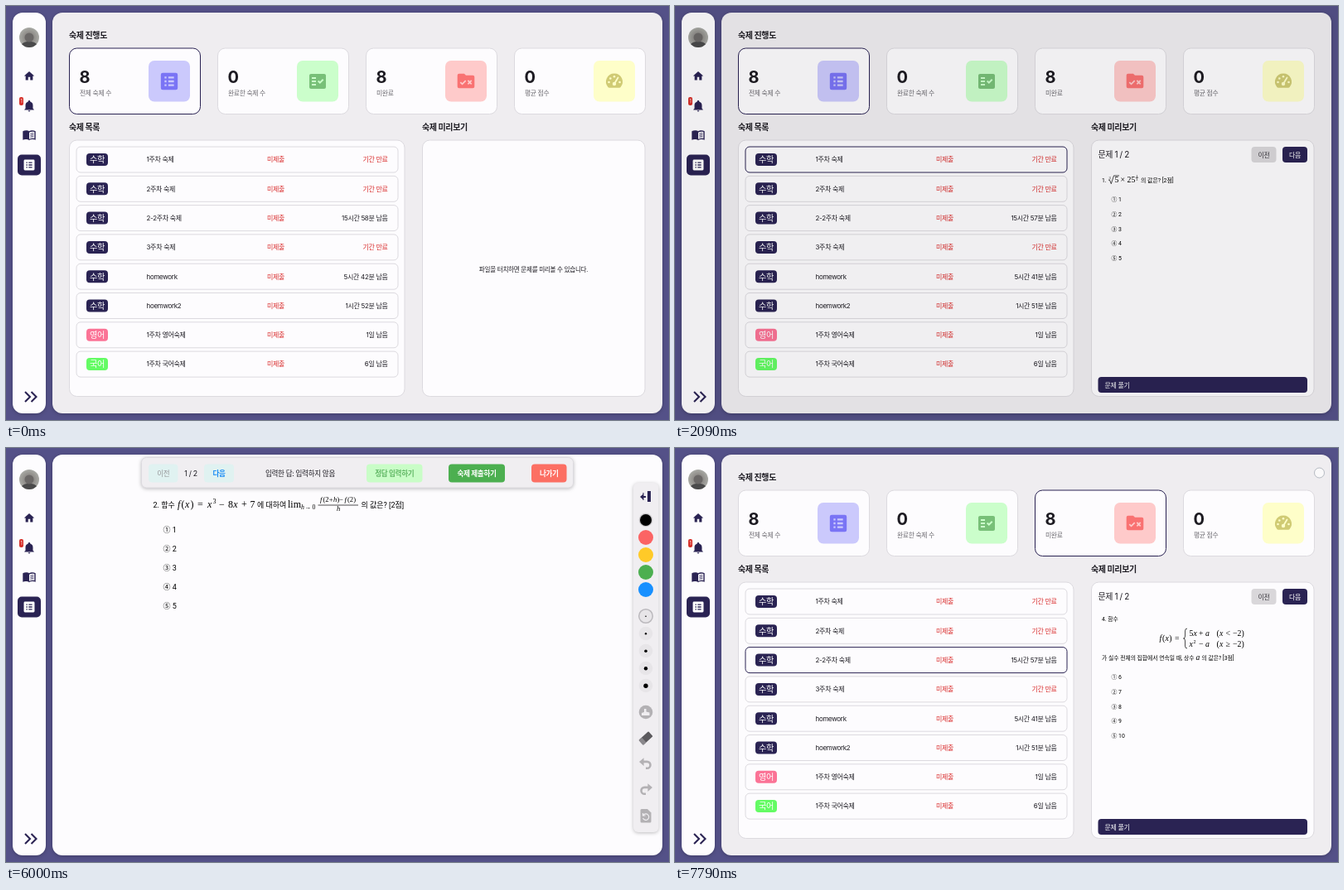
Animation of 800 by 500 pixels, one loop 7.85 s. Source, as an HTML page:

```html
<!DOCTYPE html>
<html lang="ko">
<head>
<meta charset="utf-8">
<style>
html, body { margin: 0; width: 100%; height: 100%; overflow: hidden; background: #545188; }
svg { display: block; width: 800px; height: 500px; }
text { font-family: Inter, "Noto Sans CJK KR", "Noto Sans CJK", sans-serif; letter-spacing: -.04em; fill: #1d1b22; }
.mid { text-anchor: middle; }
.end { text-anchor: end; }
.bold { font-weight: 700; }
.semi { font-weight: 600; }
.quiz { font-family: Roboto, "Noto Sans CJK KR", "Noto Sans CJK", sans-serif; letter-spacing: 0; fill: #000; }
.math { font-family: "Liberation Serif", "Noto Serif", serif; letter-spacing: 0; fill: #000; }
.it { font-style: italic; }
.box { fill: #fdfcfe; stroke: #dcdadf; }
.box.sel { stroke: #2a2353; }
.btn { fill: #2a2353; }
.btn + text { fill: #fff; }
.btn.off { fill: #d9d7da; }
.btn.off + text { fill: #3c3a40; }
.ink { fill: #2a2353; }
.line { fill: none; stroke: #000; stroke-width: .7; }
.soft { filter: drop-shadow(0 1px 2px rgba(0, 0, 0, .25)); }
</style>
</head>
<body>
<svg id="stage" viewBox="0 0 800 500"></svg>
<script>
const LOOP = 7850;
const NAVY = '#2a2353';

const text = (x, y, size, str, cls = '', fill = '') =>
  `<text x="${x}" y="${y}" font-size="${size}" class="${cls}"${fill && ` style="fill:${fill}"`}>${str}</text>`;
const rect = (x, y, w, h, r, attrs = '') =>
  `<rect x="${x}" y="${y}" width="${w}" height="${h}" rx="${r}" ${attrs}/>`;
const circle = (x, y, r, attrs = '') => `<circle cx="${x}" cy="${y}" r="${r}" ${attrs}/>`;
const group = (id, body, attrs = '') => `<g id="${id}" ${attrs}>${body}</g>`;
// 24-unit icon centred on a point
const icon = (x, y, scale, fill, body) =>
  `<g transform="translate(${x} ${y}) scale(${scale}) translate(-12 -12)" fill="${fill}" fill-rule="evenodd">${body}</g>`;
const path = (d, attrs = '') => `<path d="${d}" ${attrs}/>`;
const math = (y, size, parts) =>
  parts.map(([x, str, it]) => text(x, y, size, str, it ? 'math it' : 'math')).join('');

const LIST = path('M19 3H5a2 2 0 0 0-2 2v14a2 2 0 0 0 2 2h14a2 2 0 0 0 2-2V5a2 2 0 0 0-2-2M7 7h2v2H7zM7 11h2v2H7zM7 15h2v2H7zM17 17h-6v-2h6zM17 13h-6v-2h6zM17 9h-6V7h6z');
const CHECKS = path('M20 3H4c-1.1 0-2 .9-2 2v14c0 1.1.9 2 2 2h16c1.1 0 2-.9 2-2V5c0-1.1-.9-2-2-2zM10 17H5v-2h5v2zm0-4H5v-2h5v2zm0-4H5V7h5v2zm4.82 6L12 12.16l1.41-1.41 1.41 1.42L17.99 9l1.42 1.42L14.82 15z');
const FOLDER = path('M20 5h-8l-2-2H4a2 2 0 0 0-2 2v13a2 2 0 0 0 2 2h16a2 2 0 0 0 2-2V7a2 2 0 0 0-2-2z') +
  path('M5.5 13l2.2 2.2 4-4M14.3 11l4.2 4.2m0-4.2l-4.2 4.2', 'fill="none" stroke="#fecaca" stroke-width="1.7"');
const GAUGE = path('M12 2.5a10 10 0 0 0-7.6 16.5q.6.7 1.5.7h12.2q.9 0 1.5-.7A10 10 0 0 0 12 2.5z') +
  path('M12.3 14.5l4.2-7', 'stroke="#fefec9" stroke-width="1.8" stroke-linecap="round"') +
  [[5.5, 13], [7.3, 8.5], [12, 6.2], [18.5, 13], [12, 15]].map(([x, y], i) => circle(x, y, i < 4 ? 1.3 : 2.2, 'fill="#fefec9"')).join('');
const HOME = path('M10 20v-6h4v6h5v-8h3L12 3 2 12h3v8z');
const BELL = path('M21 19v1H3v-1l2-2v-6c0-3.1 2-5.8 5-6.7V4a2 2 0 0 1 4 0v.3c3 .9 5 3.6 5 6.7v6zM14 21a2 2 0 0 1-4 0z');
const BOOK = path('M12 6C9.500 4.200 4 4 1 6v15c3-1.500 8-1.500 11 .5 3-2 8-2 11-.5V6c-3-2-8.500-1.800-11 0zM21 18.500c-3-.8-6.500-.3-9 1V8c2.500-1.600 6-1.900 9-1z') +
  path('M14 10.500q3-1.200 5.500-.8M14 13.300q3-1.200 5.500-.8M14 16.100q3-1.200 5.500-.8', `fill="none" stroke="${NAVY}" stroke-width="1.3"`);

function sidebar() {
  return rect(8, 8, 40, 484, 12, 'fill="#fdfcfe" class="soft"') +
    circle(28, 38, 12, 'fill="url(#photo)"') +
    `<g clip-path="url(#face)">${path('M17 52c0-7 5-9 11-9s11 2 11 9z', 'fill="#4a4a4b"')}${circle(28, 38, 5.5, 'fill="#6b6867"')}</g>` +
    icon(28, 84.500, .62, NAVY, HOME) + icon(28, 120.500, .64, NAVY, BELL) +
    rect(16, 110, 5, 10, 2, 'fill="#d6302a"') + text(18.500, 117, 5.500, '1', 'mid', '#fff') +
    icon(28, 155.500, .7, NAVY, BOOK) +
    rect(14, 179.500, 28, 25, 5, 'class="ink"') + icon(28, 192, .72, '#fff', LIST) +
    path('M23 466l6 6-6 6M30.500 466l6 6-6 6', `fill="none" stroke="${NAVY}" stroke-width="2.100"`);
}

const cards = [
  [76.5, 8, '전체 숙제 수', '#cbc9fc', '#7a74f5', LIST, 1.13],
  [255.5, 0, '완료한 숙제 수', '#cbfecb', '#78c078', CHECKS, 1],
  [434.5, 8, '미완료', '#fecaca', '#f97272', FOLDER, 1.03],
  [613.5, 0, '평균 점수', '#fefec9', '#d0cb74', GAUGE, 1]
];
const card = ([x, n, label, tile, tone, shape, scale], i) =>
  rect(x, 51, 158, 79.500, 9, `class="box" id="card${i}"`) +
  text(x + 12, 93, 20, n, 'bold') + text(x + 12.500, 107.500, 7.800, label, '', '#6a686e') +
  rect(x + 95.500, 66, 50, 49.500, 7, `fill="${tile}"`) + icon(x + 120.500, 91, scale, tone, shape);

const rows = [
  ['수학', '1주차 숙제'], ['수학', '2주차 숙제'], ['수학', '2-2주차 숙제', 15, 58], ['수학', '3주차 숙제'],
  ['수학', 'homework', 5, 42], ['수학', 'hoemwork2', 1, 52],
  ['영어', '1주차 영어숙제', '1일 남음'], ['국어', '1주차 국어숙제', '6일 남음']
];
const tagColor = { 수학: NAVY, 영어: '#fb7396', 국어: '#64fb64' };
function row([tag, title, left, min], i) {
  const y = 170 + i * 35.300, base = y + 18.300;
  return rect(85, y, 388, 31, 5, `class="box" id="row${i}"`) +
    rect(97, y + 8, 26, 15, 4, `fill="${tagColor[tag]}"`) + text(110, y + 19.300, 10.200, tag, 'mid', '#fff') +
    text(169.500, base, 8, title) + text(315, base, 8, '미제출', '', '#d92b2b') +
    `<g id="left${i}">${text(460.500, base, 8, left && !min ? left : '기간 만료', 'end', left ? '' : '#d92b2b')}</g>`;
}

const choices = (x, y, gap, size, first) => [...'①②③④⑤']
  .map((mark, i) => text(x, y + i * gap, size, `${mark} ${first + i}`, 'quiz')).join('');

const quiz1 = text(515, 212.700, 6.800, '1.', 'quiz') +
  path('M523 210.500l1.300-.8 2 5 3.200-9.800h6.500', 'class="line"') + text(523.500, 208.500, 4.500, '3', 'math') +
  math(213.200, 9.800, [[530.500, 5], [537.500, '×'], [545.500, 25]]) +
  text(556.300, 206.500, 4.200, 1, 'math') + text(556.300, 211.300, 4.200, 3, 'math') + path('M555.800 207.200h3.200', 'class="line"') +
  text(562, 212.700, 6.900, '의 값은? [2점]', 'quiz') + choices(526.500, 236, 17.800, 6.900, 1);

const limitLine = text(177.500, 71.500, 9, '2. 함수', 'quiz') +
  math(72, 12, [[207, 'f', 1], [211.500, '('], [216, 'x', 1], [222.500, ')'], [231, '='], [243, 'x', 1], [257, '−'],
    [268, 8], [274.300, 'x', 1], [284, '+'], [294.500, 7]]) + text(249.500, 67, 8, 3, 'math') +
  text(303, 71.500, 9, '에 대하여', 'quiz') + text(340, 72, 12, 'lim', 'math') +
  math(74, 7.800, [[356, 'h', 1], [360.500, '→'], [369.500, 0]]) +
  math(65.300, 8.600, [[379, 'f', 1], [382.500, '(2+'], [395, 'h', 1], [399.500, ')−'], [408.500, 'f', 1], [412, '(2)']]) +
  path('M376.500 69h48.500', 'class="line"') + text(399, 76, 8.600, 'h', 'math it') +
  text(428.500, 71.500, 9, '의 값은? [2점]', 'quiz');

const quiz2 = `<g transform="translate(379.600 157.700) scale(.763)">${limitLine}</g>` + choices(526.500, 236, 17.800, 6.900, 1);

const quiz4 = text(515, 208.500, 6.800, '4. 함수', 'quiz') +
  math(233, 9.800, [[584.500, 'f', 1], [588, '('], [591.500, 'x', 1], [596.300, ')'], [603, '=']]) +
  path('M618 218q-2.500 0-2.500 3v6q0 3-2 3 2 0 2 3v6q0 3 2.500 3', 'class="line"') +
  math(227, 9.800, [[620.500, 5], [625.500, 'x', 1], [632, '+'], [640, 'a', 1], [653.500, '('], [657, 'x', 1], [664.500, '&lt;'], [673, '−2)']]) +
  math(240, 9.800, [[620.500, 'x', 1], [632, '−'], [640, 'a', 1], [653.500, '('], [657, 'x', 1], [664.500, '≥'], [673, '−2)']]) +
  text(625.500, 236, 6, 2, 'math') +
  text(515, 256, 6.800, '가 실수 전체의 집합에서 연속일 때, 상수', 'quiz') + text(628.500, 256, 9.500, 'a', 'math it') +
  text(635.500, 256, 6.800, '의 값은? [3점]', 'quiz') + choices(526.500, 279, 17.800, 6.900, 6);

function listScreen() {
  return rect(56, 8, 736, 484, 12, 'fill="#efedf0" class="soft"') +
    text(76, 38.700, 10, '숙제 진행도', 'bold') + text(76, 149.700, 10, '숙제 목록', 'bold') +
    text(502, 149.700, 10, '숙제 미리보기', 'bold') + cards.map(card).join('') +
    rect(76.500, 162, 404.500, 309.500, 9, 'class="box"') + rows.map(row).join('') +
    rect(502.500, 162, 268.500, 309.500, 9, 'class="box"') +
    group('empty', text(636.500, 321.300, 7.600, '파일을 터치하면 문제를 미리볼 수 있습니다.', 'mid')) +
    group('preview',
      `<text id="page" x="510.500" y="183.200" font-size="10"></text>` +
      rect(695.500, 170, 30, 19, 4, 'class="btn" id="prev"') + text(710.500, 182.500, 8, '이전', 'mid') +
      rect(733, 170, 30, 19, 4, 'class="btn" id="next"') + text(748, 182.500, 8, '다음', 'mid') +
      rect(510.500, 448, 252.500, 19, 4, 'class="btn"') + text(518.500, 460.500, 8, '문제 풀기')) +
    group('quiz1', quiz1) + group('quiz2', quiz2) + group('quiz4', quiz4);
}

const button = (x, w, fill, color, label, cls) =>
  rect(x, 19.500, w, 22, 4, `fill="${fill}"`) + text(x + w / 2, 33.600, 8.600, label, 'mid ' + cls, color);

function palette() {
  const colors = ['#000', '#fb6464', '#ffca28', '#4caf50', '#1890ff'];
  const pens = [.8, 1.200, 1.800, 2.200, 2.700];
  const grey = '#b3b1b4';
  const arrow = path('M2 9l7-6v4h5a6 6 0 0 1 0 13h-2v-3h2a3 3 0 0 0 0-6.500H9V15z');
  return rect(757, 42, 30.500, 422, 6, 'fill="#f0eef1" class="soft"') +
    path('M774 52h4v13h-4zM765 59l4-3.500v2.500h3v2h-3v2.500z', 'class="ink"') +
    path('M769 54v9', `stroke="${NAVY}"`) +
    circle(772, 87, 8.300, 'fill="#c9c7ca"') +
    colors.map((c, i) => circle(772, 87 + 21 * i, i ? 9 : 7, `fill="${c}"`)).join('') +
    pens.map((r, i) => circle(772, 203 + 21 * i, 8.300, `fill="#e7e5e8"${i ? '' : ' stroke="#bbb9bd" stroke-width="1.500"'}`) +
      circle(772, 203.300 + 21 * i, r)).join('') +
    circle(772, 319, 8.300, `fill="${grey}"`) +
    path('M767 323v-3l3-1v-4h2.500v3.500l4 1v3.500z', 'fill="#f0eef1"') +
    `<g transform="rotate(-42 772 350.500)">${rect(764, 346.500, 16, 8, 1, 'fill="#5b595d"')}${rect(764, 346.500, 5, 8, 1, 'fill="#8a888c"')}</g>` +
    icon(772, 381.500, .8, grey, arrow) +
    `<g transform="translate(1544 0) scale(-1 1)">${icon(772, 412.500, .8, grey, arrow)}</g>` +
    path('M767 436h7l4.500 4.500v10.500q0 1.500-1.500 1.500h-10q-1.500 0-1.500-1.500v-13.500q0-1.500 1.500-1.500z', `fill="${grey}"`) +
    path('M769 443.500a3.700 3.700 0 1 1-.4 3.500M768.500 441v3h3', 'fill="none" stroke="#f0eef1" stroke-width="1.200"');
}

function solveScreen() {
  return rect(56, 8, 736, 484, 12, 'fill="#fdfcfe" class="soft"') +
    rect(163.500, 11.500, 521, 36.500, 6, 'fill="#f0eef1" stroke="#dcdadf" class="soft"') +
    button(172, 35.500, '#e0f2f1', '#98999b', '이전', '') + text(223, 33.700, 8.800, '1 / 2', 'mid') +
    button(239, 36, '#e0f2f1', '#1a8cf5', '다음', 'bold') +
    text(313, 33.500, 8.600, '입력한 답: 입력하지 않음') +
    button(435, 67.500, '#c9fdc7', '#62b866', '정답 입력하기', 'bold') +
    button(534, 68, '#4caf50', '#fff', '숙제 제출하기', 'bold') +
    group('exit', button(634, 42.500, '#fc6f63', '#fff', '나가기', 'bold')) +
    group('limit', limitLine) + choices(189.500, 101.800, 23.150, 9, 1) + palette();
}

const dialog = (id, title, message, buttons) => group(id,
  rect(229, 202, 341.500, 96, 2, 'fill="#fdfcfe" class="soft"') +
  text(243.500, 224.500, 11.600, title) + text(243.500, 243.500, 9.400, message) + buttons);

document.getElementById('stage').innerHTML =
  `<defs><radialGradient id="photo"><stop stop-color="#77716f"/><stop offset="1" stop-color="#a9aaa5"/></radialGradient>
   <clipPath id="face">${circle(28, 38, 12)}</clipPath></defs>` +
  rect(0, 0, 800, 500, 0, 'fill="#545188"') + sidebar() +
  group('list', listScreen()) + group('solve', solveScreen()) +
  rect(0, 0, 800, 500, 0, 'id="dim"') +
  dialog('late', '알림', '기한이 지난 숙제는 제출할 수 없습니다.', text(544.500, 283, 8, 'OK', 'mid bold', '#2e9e5b')) +
  dialog('leave', '진행 상황 삭제', '현재까지 진행 상황이 모두 삭제됩니다. 나가시겠습니까?',
    text(507, 283, 8, '취소', 'mid', '#1b9a6e') + text(544.500, 283, 8, '나가기', 'mid', '#1b9a6e')) +
  circle(0, 0, 6, 'id="dot" fill="#fff" fill-opacity=".65" stroke="#8c94a0" stroke-opacity=".6"');

const el = id => document.getElementById(id);
const within = (t, a, b) => t >= a && t < b;
const show = (id, on) => { el(id).style.display = on ? '' : 'none'; };
const fade = (id, value) => { el(id).style.opacity = value; };
const mark = (id, cls, on) => el(id).classList.toggle(cls, on);

// linear track through [ms, value] points
function track(t, keys) {
  if (t <= keys[0][0]) return keys[0][1];
  for (let i = 1; i < keys.length; i++) {
    const [a, u] = keys[i - 1], [b, v] = keys[i];
    if (t < b) return u + (v - u) * (t - a) / (b - a);
  }
  return keys[keys.length - 1][1];
}

// x, y, press, lift, gone
const taps = [
  [270, 186, 60, 180, 250], [670, 456, 1390, 1500, 1710], [544, 280, 2000, 2030, 2080],
  [513, 91, 2520, 2570, 2630], [279, 256, 3000, 3120, 3360], [748, 180, 4000, 4120, 4210],
  [688.500, 462, 4640, 4780, 4900], [641, 25, 6390, 6700, 6830], [544, 280, 7000, 7080, 7180],
  [777.500, 30, 7760, 7850, 7850]
];
const DIM = [[1490, 0], [1610, .38], [2000, .38], [2105, 0], [6715, 0], [6760, .17], [6790, .38], [7060, .38], [7180, 0]];
const LATE = [[1490, 0], [1610, .93], [1660, .96], [2000, .96], [2080, 0]];
const LEAVE = [[6715, 0], [6760, .55], [6790, .96], [7060, .96], [7150, 0]];

function render(t) {
  const solving = within(t, 4880, 7210);
  show('list', !solving);
  show('solve', solving);
  show('limit', t >= 5520);

  mark('card0', 'sel', t < 2550);
  mark('card2', 'sel', t >= 2550);
  mark('row0', 'sel', within(t, 150, 3060));
  mark('row2', 'sel', t >= 3060);
  rows.forEach(([, , hour, min], i) => {
    if (min) el('left' + i).firstChild.textContent = `${hour}시간 ${min - (t >= 150)}분 남음`;
  });

  const second = within(t, 4090, 7210);
  show('empty', t < 150);
  show('preview', t >= 150);
  el('page').textContent = `문제 ${second ? 2 : 1} / 2`;
  mark('prev', 'off', !second);
  mark('next', 'off', second);
  show('quiz1', within(t, 450, 3520));
  show('quiz2', within(t, 3520, 4150));
  show('quiz4', t >= 4150);

  fade('exit', within(t, 6420, 6800) ? .45 : 1);
  fade('dim', track(t, DIM));
  fade('late', track(t, LATE));
  fade('leave', track(t, LEAVE));

  const tap = taps.find(([, , press, , gone]) => within(t, press, gone));
  show('dot', tap);
  if (tap) {
    const [x, y, , lift, gone] = tap;
    el('dot').setAttribute('cx', x);
    el('dot').setAttribute('cy', y);
    fade('dot', track(t, [[lift, 1], [gone, 0]]));
  }
}

function tick(now) {
  render(now % LOOP);
  requestAnimationFrame(tick);
}
render(0);
requestAnimationFrame(tick);
</script>
</body>
</html>
```
